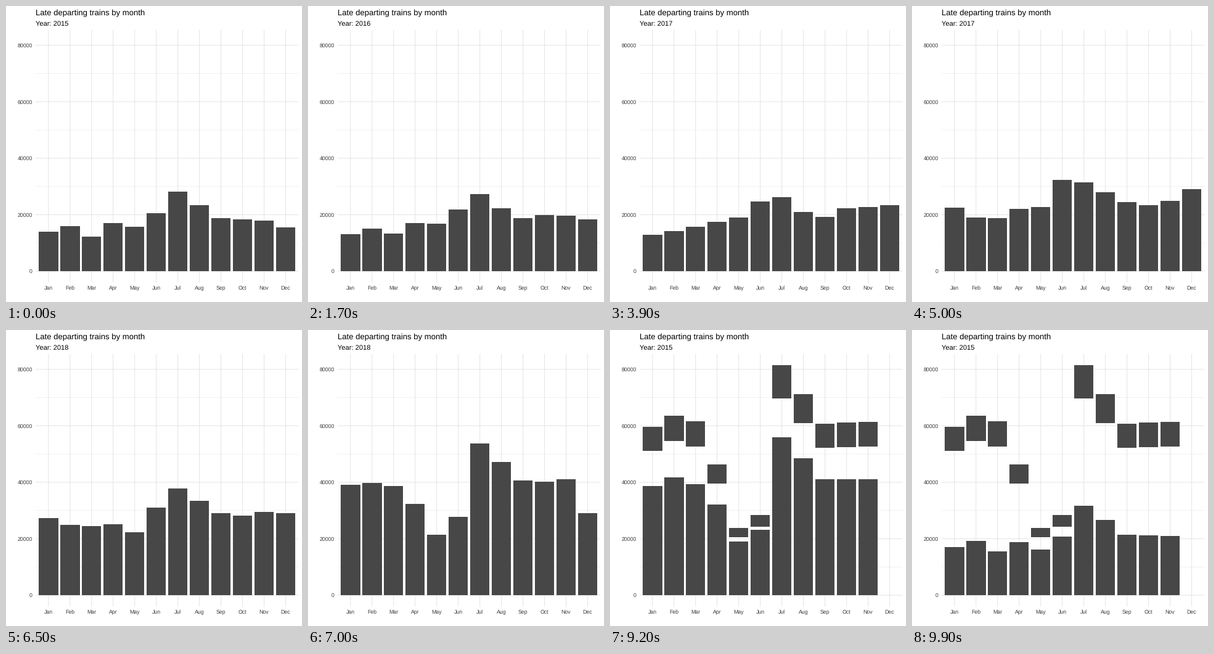
A matplotlib script for the animation above (10 s loop, 480 px wide and 480 px high).

```python
import numpy as np
import matplotlib.pyplot as plt
from matplotlib.animation import FuncAnimation

plt.rcParams["font.family"] = "Liberation Sans"
plt.rcParams["text.hinting"] = "none"

SIZE, DPI = 480, 72
FRAMES, INTERVAL, PER_YEAR = 100, 100, 25
LEFT, STEP = 47.82, 34.975
RIGHT, TOP, BOTTOM = LEFT + 12.2 * STEP, 38.7, 448.6
ZERO, SCALE = 430.0, 372.7 / 81400
BAR, GRID, AXIS_TEXT = "#474747", "#e6e6e6", "#3c3c3c"

MONTHS = "Jan Feb Mar Apr May Jun Jul Aug Sep Oct Nov Dec".split()
YEARS = [2015, 2016, 2017, 2018]
# Turning points in thousands of trains by month, linear in between.
TURNS = [
    {1: 13.9, 2: 15.9, 3: 12.2, 4: 17, 5: 15.8, 6: 20.5, 7: 28.2,
     9: 18.7, 11: 18, 12: 15.5},
    {1: 12.1, 3: 15.4, 5: 18.6, 6: 24, 7: 25.7, 8: 20.4, 9: 18.7,
     10: 22.1, 12: 22.8},
    {1: 22.4, 2: 19, 3: 18.8, 4: 22.1, 5: 22.7, 6: 32.3, 7: 31.5,
     9: 24.4, 10: 23.4, 11: 25, 12: 29},
    {1: 59.7, 2: 63.6, 3: 61.5, 4: 46.2, 5: 23.9, 6: 28.4, 7: 81.4,
     9: 60.8, 11: 61.3},
]
LAST = len(YEARS) - 1
EXTRA_SHARE = 1 / 7  # part of the last year's bars that never moves


def monthly(turns):
    """Late trains for all months, NaN after the last known one."""
    return 1000 * np.interp(np.arange(1, 13), list(turns),
                            list(turns.values()), right=np.nan)


totals = np.array([monthly(turns) for turns in TURNS])
extra = np.nan_to_num(totals[LAST] * EXTRA_SHARE)
moving = totals.copy()
moving[LAST] -= extra
centers = LEFT + STEP * (0.6 + np.arange(12))


def to_y(value):
    return ZERO - value * SCALE


fig = plt.figure(figsize=(SIZE / DPI, SIZE / DPI), dpi=DPI, facecolor="white")
ax = fig.add_axes([0, 0, 1, 1])
ax.set_xlim(0, SIZE)
ax.set_ylim(SIZE, 0)
ax.axis("off")


def grid_line(xs, ys, width):
    ax.plot(xs, ys, color=GRID, lw=width, solid_capstyle="butt",
            snap=False, zorder=1)


def label(x, y, text, size, color="black", ha="left"):
    return ax.text(x, y, text, fontsize=size, color=color, ha=ha,
                   va="baseline")


def make_bars():
    return ax.bar(centers, np.zeros(12), width=0.9 * STEP, color=BAR,
                  linewidth=0, snap=True, zorder=2)


def set_bars(bars, low, high):
    for bar, a, b in zip(bars, low, high):
        bar.set_y(to_y(b))
        bar.set_height((b - a) * SCALE)
        bar.set_visible(b > a)


for value in range(10000, 80000, 20000):
    grid_line([LEFT, RIGHT], [to_y(value)] * 2, 0.53)
for value in range(0, 80001, 20000):
    grid_line([LEFT, RIGHT], [to_y(value)] * 2, 1.07)
    label(42.8, to_y(value) + 3.3, str(value), 8.8, AXIS_TEXT, "right")
for x, month in zip(centers, MONTHS):
    grid_line([x, x], [TOP, BOTTOM], 1.07)
    label(x, 460, month, 8.8, AXIS_TEXT, "center")

label(LEFT, 15, "Late departing trains by month", 13.1)
subtitle = label(LEFT, 32, "", 11.1)
stack = make_bars()
top_stack = make_bars()


def update(frame):
    year, step = divmod(frame, PER_YEAR)
    following = (year + 1) % len(YEARS)
    hold = 12 if year == 0 else 13
    t = max(0, (step - hold) / (PER_YEAR - hold))

    # A month missing next year stays put; one missing now is absent.
    start, end = moving[year], moving[following]
    end = np.where(np.isnan(end), start, end)
    set_bars(stack, np.zeros(12), np.nan_to_num(start + (end - start) * t))

    base = np.nan_to_num(start)
    set_bars(top_stack, base, base + extra * (year == LAST))

    subtitle.set_text(f"Year: {YEARS[following if t > 0 else year]}")
    return [*stack, *top_stack, subtitle]


anim = FuncAnimation(fig, update, frames=FRAMES, interval=INTERVAL,
                     repeat=True, repeat_delay=0, blit=False)
plt.show()
```
